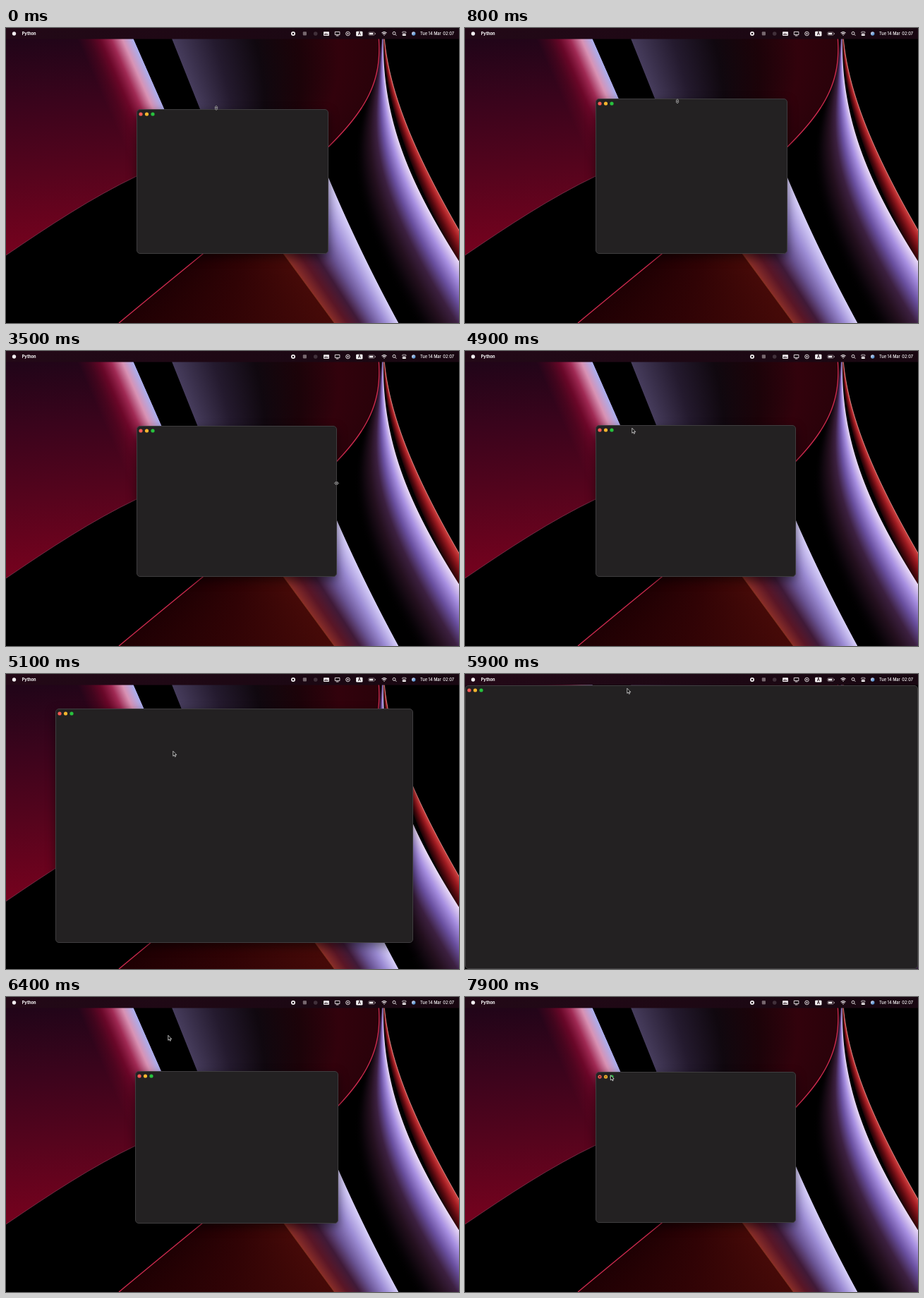
These frames come from a looping animation (642 by 418 pixels, 8000 ms). An HTML page with a canvas:

```html
<!DOCTYPE html>
<html lang="en">
<head>
<meta charset="utf-8">
<title>Resizing a window</title>
<style>
html, body { margin: 0; width: 100%; height: 100%; overflow: hidden; background: #000; }
#stage { position: relative; width: 642px; height: 418px; overflow: hidden; }
#stage > * { position: absolute; left: 0; top: 0; }
#win {
  box-sizing: border-box; background: #232122; border: 1px solid #3f3d3f;
  border-radius: 5px; box-shadow: 0 5px 14px rgba(0, 0, 0, .5);
}
#win svg { position: absolute; left: -1px; top: -1px; }
text { font-family: Inter, "Open Sans", sans-serif; }
</style>
</head>
<body>
<div id="stage">
  <canvas id="wall" width="642" height="418"></canvas>

  <div id="win">
    <svg width="30" height="14">
      <circle cx="6" cy="7" r="2.6" fill="#f85a55"/>
      <circle cx="14.5" cy="7" r="2.6" fill="#f6b62e"/>
      <circle cx="23" cy="7" r="2.6" fill="#28c23e"/>
      <g id="marks" stroke="#3a1408" stroke-width=".7">
        <path d="M4.9 5.9l2.2 2.2m0-2.2l-2.2 2.2M13 7h3"/>
        <path d="M21.7 5.7h1.8l-1.8 1.8zM24.3 8.3h-1.8l1.8-1.8z" fill="#0b5a18" stroke="none"/>
      </g>
    </svg>
  </div>

  <svg id="menu" width="642" height="16" fill="none" stroke="#f2eef0" stroke-width=".9">
    <defs>
      <linearGradient id="bar">
        <stop stop-color="#230917"/><stop offset="1" stop-color="#180711"/>
      </linearGradient>
      <linearGradient id="orb" x2="1" y2="1">
        <stop stop-color="#e8e4f4"/><stop offset="1" stop-color="#2a7cc8"/>
      </linearGradient>
    </defs>
    <rect width="642" height="15.6" fill="url(#bar)" stroke="none"/>
    <circle cx="11.5" cy="8" r="2.7" fill="#f2eef0" stroke="none"/>
    <g fill="#fff" stroke="none" font-size="5.7">
      <text x="22.7" y="10.1" font-weight="700">Python</text>
      <text x="587" y="10.1" font-weight="500">Tue 14 Mar</text>
      <text x="635" y="10.1" font-weight="500" text-anchor="end">02:07</text>
    </g>
    <circle cx="407" cy="8" r="2.2" stroke-width="1.7"/>
    <rect x="420.8" y="5.3" width="5.2" height="5.2" rx="1" fill="#77686f" stroke="none"/>
    <circle cx="438.7" cy="8" r="2.8" fill="#41303a" stroke="none"/>
    <rect x="450" y="5.2" width="8" height="5.8" rx=".8" fill="#f2eef0" stroke="none"/>
    <text x="454" y="9.5" font-size="3.6" font-weight="700" fill="#22101a" stroke="none" text-anchor="middle">abc</text>
    <path d="M466.3 5.4h6.6v4.2h-6.6zM467.8 11h3.6"/>
    <circle cx="484.5" cy="8" r="2.8"/>
    <path d="M483.7 6.6v2.8l2.3-1.4z" fill="#f2eef0" stroke="none"/>
    <rect x="496.2" y="4.7" width="9.2" height="6.8" rx="1.2" fill="#fff" stroke="none"/>
    <text x="500.8" y="10.1" font-size="5.6" font-weight="700" fill="#1c0612" stroke="none" text-anchor="middle">A</text>
    <rect x="513.8" y="5.9" width="8.6" height="4.3" rx="1.2" stroke-width=".6" stroke="#a99fa5"/>
    <path d="M514.8 8.05h5.6" stroke-width="2.6"/>
    <path d="M523.4 7.3v1.5" stroke-width=".7"/>
    <path d="M532.5 7.2q3.5-3.1 7 0M533.8 8.6q2.2-1.9 4.4 0M535.2 10h1.6" stroke-width="1.1"/>
    <circle cx="550" cy="7.4" r="2"/>
    <path d="M551.5 8.9l1.9 1.9"/>
    <rect x="561.6" y="5.2" width="5.4" height="2.2" rx="1.1" stroke-width=".7"/>
    <rect x="561.6" y="8.6" width="5.4" height="2.4" rx="1.2" fill="#f2eef0" stroke="none"/>
    <circle cx="577.7" cy="8" r="2.7" fill="url(#orb)" stroke="none"/>
  </svg>

  <svg width="642" height="418">
    <g id="cursor" stroke="#fff" stroke-linejoin="round">
      <path id="arrow" d="M0 0V7L1.6 5.6 2.7 8 3.8 7.5 2.8 5.2H4.9Z" fill="#000" stroke-width=".7"/>
      <path id="sizer" d="M0-3.2L2-.8H-2ZM0 3.2L2 .8H-2Z" fill="#111" stroke="#d8d8d8" stroke-width=".6"/>
    </g>
  </svg>
</div>

<script>
const $ = id => document.getElementById(id);
const ctx = $('wall').getContext('2d');

// x at height y on a cubic Bézier that runs downwards
const bezier = (xs, ys) => y => {
  const at = (p, t) => {
    const s = 1 - t;
    return p[0] * s * s * s + 3 * p[1] * s * s * t + 3 * p[2] * s * t * t + p[3] * t * t * t;
  };
  let lo = 0, hi = 1;
  for (let i = 0; i < 20; i++) {
    const mid = (lo + hi) / 2;
    if (at(ys, mid) < y) lo = mid; else hi = mid;
  }
  return at(xs, lo);
};

// Shade between two edges, row by row, with evenly spaced colours
function band(y0, y1, left, right, ...colors) {
  for (let y = y0; y < y1; y++) {
    const a = left(y + .5), b = right(y + .5);
    if (b <= a) continue;
    const g = ctx.createLinearGradient(a, 0, b, 0);
    colors.forEach((c, i) => g.addColorStop(i / (colors.length - 1), c));
    ctx.fillStyle = g;
    ctx.fillRect(a, y, b - a, 1);
  }
}

function line(x, y0, y1, color, width) {
  ctx.beginPath();
  for (let y = y0; y <= y1; y += 2) ctx.lineTo(x(y), y);
  ctx.strokeStyle = color;
  ctx.lineWidth = width;
  ctx.stroke();
}

function paintWall() {
  const sheet = y => 174 + .44 * y;
  const drum = y => 229 + .4 * y;
  const ember = y => 158 + .735 * y;
  const fold = y => 457 + .42 * (y - 212) + .0003 * (y - 212) ** 2;
  const rim = bezier([527, 542, 470, 160], [0, 127, 160, 418]);
  const roll = bezier([535, 530, 585, 700], [0, 150, 250, 418]);
  const rollBack = bezier([533, 520, 430, 578], [0, 140, 160, 418]);
  const ribbon = bezier([535, 540, 575, 680], [0, 85, 180, 350]);

  ctx.fillStyle = '#000';
  ctx.fillRect(0, 0, 642, 418);

  // Red sheet, cut off below by a shallow curve
  const hem = new Path2D('M0 322C60 281 122 240 185 210');
  const area = new Path2D('M0 0V322C60 281 122 240 185 210H266L174 0Z');
  const g = ctx.createLinearGradient(50, 0, 70, 310);
  ['#1d0518', '#3a041c', '#56041d', '#74021e'].forEach((c, i) => g.addColorStop(i / 3, c));
  ctx.fillStyle = g;
  ctx.fill(area);
  ctx.save();
  ctx.clip(area);
  band(0, 215, y => sheet(y) - 80, sheet, 'rgba(110,6,36,0)', 'rgba(110,6,36,.35)',
    'rgba(120,8,44,.8)', '#a02a54', '#d892b4', '#a8b0f0');
  ctx.restore();
  ctx.strokeStyle = '#84405a';
  ctx.lineWidth = .7;
  ctx.stroke(hem);

  // Ribbon and roll on the right
  band(0, 340, y => ribbon(y) - .09 * y, ribbon, '#180205', '#5c0a10', '#a01c22', '#d04442');
  line(ribbon, 0, 340, '#e89a9a', .8);
  band(0, 418, rollBack, roll, 'rgba(0,0,0,0)', '#0c050b', '#24101f', '#3c2040', '#6a50a0', '#a68ee0', '#ecdcf8');

  // Floor and lower fold
  band(200, 418, ember, fold, '#8a2e28', '#5a1626', '#401a38', '#6a5494', '#9c8cd4', '#d8d0fa');
  band(300, 418, rim, ember, '#1e0003', '#300305', '#460a08');
  line(ember, 310, 418, '#84351c', .8);

  // Drum and its bright rim
  band(0, 200, drum, rim, '#463c5c', '#241a2e', '#10080f', '#1c0309', '#32020c', '#2a020a');
  line(rim, 0, 418, '#cc2a4e', 1.4);
}

const ease = (t, a, b) => {
  const u = Math.min(1, Math.max(0, (t - a) / (b - a)));
  return u * u * (3 - 2 * u);
};
const dragTop = t => 7.5 * ease(t, 700, 1000) - 17 * ease(t, 200, 650);
const dragSide = t => 21 * ease(t, 2700, 3100) - 9 * ease(t, 3100, 3500);

function moveWindow(t) {
  const zoom = ease(t, 4890, 5250) - ease(t, 6150, 6415);
  const mix = (a, b) => a + (b - a) * zoom;
  const l = mix(185, 0), r = mix(457 + dragSide(t), 642);
  const top = mix(115 + dragTop(t), 15.5), b = mix(320, 418);
  Object.assign($('win').style, {
    left: l + 'px', top: top + 'px', width: r - l + 'px', height: b - top + 'px'
  });
}

// The window trails the pointer by 200 ms while its top edge is dragged.
function moveCursor(t) {
  let x = 298 + 3 * ease(t, 0, 800) + dragSide(t), y = 113.3 + dragTop(t + 200);
  const go = (a, b, dx, dy) => { x += dx * ease(t, a, b); y += dy * ease(t, a, b); };
  go(1400, 2500, 155.5, 83.5);
  go(3700, 4500, -231.7, -78);
  go(5200, 5800, -7, -89);
  go(6200, 6600, 0, 68);
  go(6600, 7400, -15.8, 10);
  go(7500, 7900, -7.7, 12.5);

  const upright = t < 1500, sideways = t >= 2500 && t < 3800, sizing = upright || sideways;
  $('cursor').setAttribute('transform', `translate(${x} ${y}) rotate(${sideways ? 90 : 0})`);
  $('sizer').style.display = sizing ? '' : 'none';
  $('arrow').style.display = sizing ? 'none' : '';
}

function draw() {
  const t = Math.floor(performance.now() % 8000 / 100 + .001) * 100; // ten pictures a second
  moveWindow(t);
  moveCursor(t);
  $('marks').style.display = t >= 7800 ? '' : 'none';
  requestAnimationFrame(draw);
}

paintWall();
draw();
</script>
</body>
</html>
```
